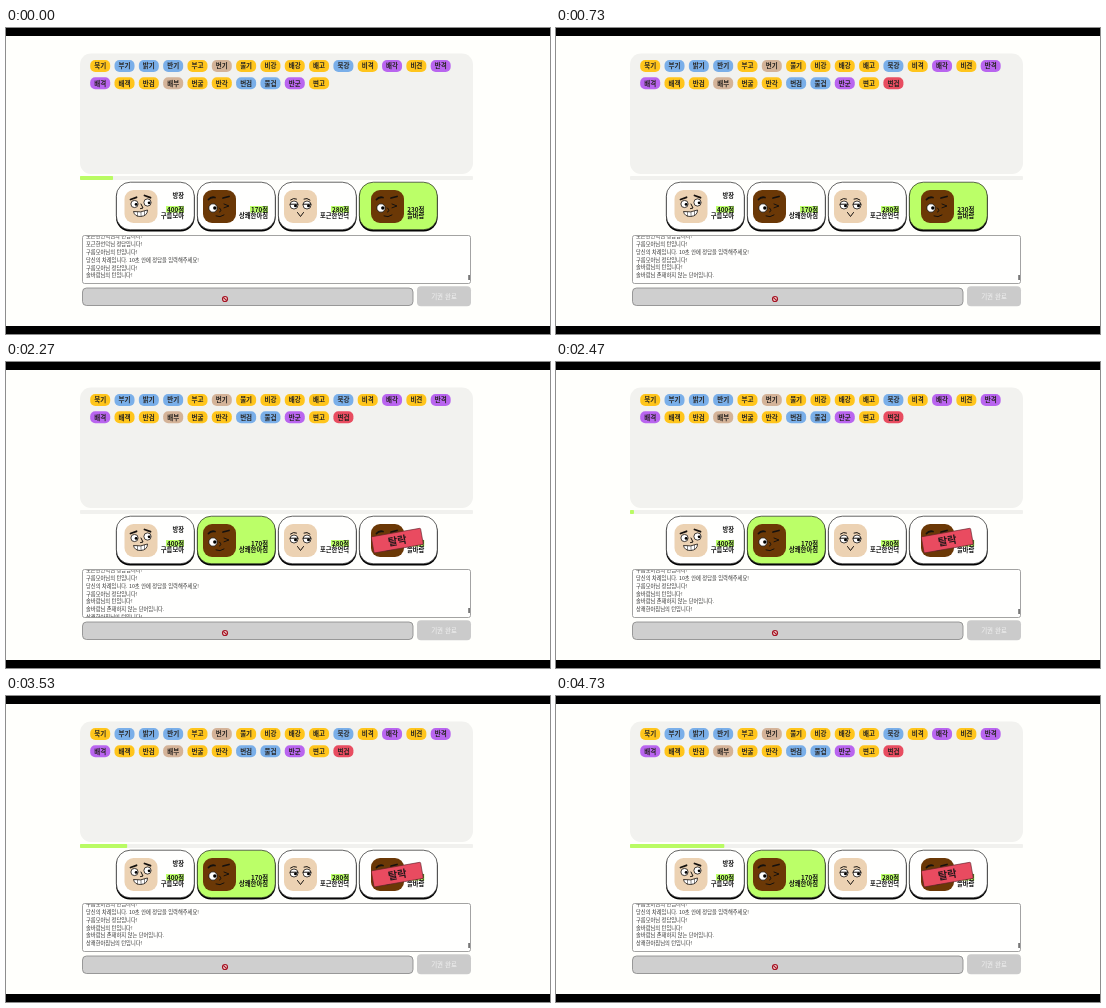
These frames come from a looping animation (544 px wide and 306 px high, 4790 ms). An HTML page:

```html
<!DOCTYPE html>
<html lang="ko">
<head>
<meta charset="utf-8">
<title>Word game</title>
<style>
html, body { margin: 0; width: 100%; height: 100%; overflow: hidden; background: #fffffc; }
svg { display: block; width: 544px; height: 306px; font-family: "Noto Sans CJK KR", "Noto Sans CJK", "Noto Sans", sans-serif; }
.chip { font-size: 6.5px; font-weight: 900; fill: #262320; text-anchor: middle; }
.info { font-size: 6.3px; font-weight: 900; fill: #111; text-anchor: end; }
.log { font-size: 5.25px; font-weight: 500; fill: #333; }
.button { font-size: 6.5px; font-weight: 500; fill: #f2f2f2; text-anchor: middle; }
.stamp { font-size: 10.3px; font-weight: 900; fill: #27191b; text-anchor: middle; }
.ink { fill: none; stroke: #15110e; stroke-width: 1; stroke-linecap: round; stroke-linejoin: round; }
.brow { stroke-width: 1.8; }
.eye { fill: #fff; stroke: #15110e; stroke-width: .8; }
</style>
</head>
<body>
<svg viewBox="0 0 544 306">
  <defs>
    <clipPath id="logClip"><rect x="77" y="208" width="387" height="47.3"/></clipPath>
    <g id="grin">
      <path class="ink brow" d="M6 9.5l6-2.2M20 5.5l6 2.2"/>
      <circle class="eye" cx="10" cy="14" r="3.6"/><circle class="eye" cx="23" cy="12.5" r="3.6"/>
      <circle cx="11.6" cy="14.4" r="1.4"/><circle cx="24.6" cy="12.8" r="1.4"/>
      <path class="ink" d="M16.5 14l2 4-2.5.6"/>
      <path class="eye" d="M9 21.5Q16 23 23 20Q23 26 16 26.5Q10 26.5 9 21.5Z"/>
      <path class="ink" style="stroke-width:.5" d="M13 22.3v3.7M16.5 22.2v4.2M20 21.3v4"/>
    </g>
    <g id="wink">
      <path class="ink brow" d="M5.5 9.5Q8 6.5 12 7.5M20 8l6-1.5"/>
      <circle class="eye" cx="10" cy="18" r="4.2"/><circle cx="11.8" cy="18" r="1.7"/>
      <path class="ink" d="M21 14l5 2-5 1.8M16.5 18q3 3 0 4M13 26q4 2 8-1"/>
    </g>
    <g id="calm">
      <path class="ink" d="M6.5 10q3-2.5 6-1M20 9q3-1.5 6 1"/>
      <circle class="eye" cx="10" cy="15" r="4"/><circle class="eye" cx="23" cy="15" r="4"/>
      <path class="ink" d="M6 14.2h8M19 14.2h8"/>
      <circle cx="11.5" cy="15.8" r="1.5"/><circle cx="24.5" cy="15.8" r="1.5"/>
      <path class="ink" d="M13.5 22.5l3 4 3-4"/>
    </g>
  </defs>
  <rect width="544" height="8"/>
  <rect y="298" width="544" height="8"/>
  <rect x="74" y="25.5" width="393" height="120.5" rx="11" fill="#f2f2ef"/>
  <g id="chips"></g>
  <rect x="74" y="148" width="393" height="4" rx="1" fill="#f1f1ee"/>
  <rect id="bar" x="74" y="148" height="4" rx=".8" fill="#b9fb63"/>
  <g id="cards"></g>
  <g id="stamp" transform="translate(391.3 178.6) rotate(-10)">
    <rect x="-25" y="-8.2" width="50" height="16.4" rx="1" fill="#e94b60" stroke="#5c222a" stroke-width=".6"/>
    <text class="stamp" y="3.8">탈락</text>
  </g>
  <rect x="76.5" y="207.5" width="388" height="48" rx="2" fill="#fffffe" stroke="#8c8c8c" stroke-width=".8"/>
  <g clip-path="url(#logClip)"><g id="log"></g></g>
  <rect id="thumb" x="462.2" y="247" width="1.8" height="5" fill="#777"/>
  <rect x="76.5" y="260" width="330.5" height="17.5" rx="4" fill="#cfcfcf" stroke="#858585" stroke-width=".8"/>
  <rect x="411" y="258.3" width="54" height="20" rx="4" fill="#cbcbcb"/>
  <text class="button" x="438" y="270.6">기권 완료</text>
  <g fill="#f3dada" stroke="#a51423" stroke-width="1.2">
    <circle cx="219" cy="271" r="2.5"/><path d="M217.3 269.3l3.4 3.4"/>
  </g>
</svg>
<script>
const LOOP = 4790, GREEN = '#bbff68', STEP = 393 / 50, LINE = 7.8;
const $ = id => document.getElementById(id);
const text = (cls, x, y, s) => `<text class="${cls}" x="${x}" y="${y}">${s}</text>`;

const colors = { y: '#ffc51c', b: '#7aafe9', t: '#d4b398', p: '#b965ef', r: '#e84d60' };
const rows = [
  ['북기 부기 밝기 반기 부고 번기 물기 비강 배강 배고 북강 비격 배각 비견 반격', 'ybbbytyyyybypyp'],
  ['배격 배객 반검 배부 번굴 반각 번검 물겁 반군 변고 변겁', 'pyytyybbpyr']
];
$('chips').innerHTML = rows.map(([words, tones], r) => words.split(' ').map((word, i) => {
  const x = 94.2 + 24.32 * i, y = 38 + 17.2 * r;
  return `<g><rect x="${x - 10}" y="${y - 6}" width="20" height="12" rx="5" fill="${colors[tones[i]]}"/>${text('chip', x, y + 2.4, word)}</g>`;
}).join('')).join('');
const lastChip = $('chips').lastElementChild;

const SKIN = '#ecd2b3', BROWN = '#6b3806';
const players = [
  { name: '구름모아', score: 400, face: 'grin', tone: SKIN, left: 118.5, right: 178, host: true },
  { name: '상쾌한아침', score: 170, face: 'wink', tone: BROWN, left: 197, right: 262 },
  { name: '포근한언덕', score: 280, face: 'calm', tone: SKIN, left: 278, right: 343 },
  { name: '솔바람', score: 230, face: 'wink', tone: BROWN, left: 365, right: 418.3 }
];
$('cards').innerHTML = players.map((p, i) => {
  const x = 110.3 + 81 * i;
  return `<rect x="${x - .3}" y="156" width="78.6" height="47.6" rx="14"/>
    <rect class="card" x="${x}" y="154.2" width="78" height="47.6" rx="14" stroke="#222" stroke-width=".7"/>
    <rect x="${p.left}" y="162" width="33" height="33" rx="9" fill="${p.tone}"/>
    <use href="#${p.face}" x="${p.left}" y="162"/>
    <rect x="${p.right - 18}" y="178" width="18" height="6.6" fill="${GREEN}"/>
    ${p.host ? text('info', p.right, 170.4, '방장') : ''}
    ${text('info', p.right, 183.5, p.score + '점')}${text('info', p.right, 190.4, p.name)}`;
}).join('');
const cards = document.querySelectorAll('.card');

const [first, second, third, fourth] = players.map(p => p.name + '님');
const turn = who => who + '의 턴입니다!', correct = who => who + ' 정답입니다!';
$('log').innerHTML = [
  turn(third), correct(third), turn(first),
  '당신의 차례입니다. 10초 안에 정답을 입력해주세요!',
  correct(first), turn(fourth), fourth + ' 존재하지 않는 단어입니다.', turn(second)
].map((s, i) => text('log', 80, 210.3 + LINE * i, s)).join('');
const lines = $('log').children;

// The timer advances every 200 ms, in two half steps 60 ms apart.
const ticks = t => Math.floor(t / 200) + (t % 200 < 60 ? .5 : 1);
const show = (el, on) => el.setAttribute('visibility', on ? 'visible' : 'hidden');

function render(t) {
  const out = t >= 2270;
  const steps = t < 270 ? ticks(t + 730) + .2 : t < 2470 ? 0 : ticks(t - 2470);
  $('bar').setAttribute('width', steps * STEP);
  show(lastChip, t >= 270);
  show(lines[6], t >= 270);
  show(lines[7], out);
  show($('stamp'), out);
  cards.forEach((c, i) => c.setAttribute('fill', i === (out ? 1 : 3) ? GREEN : '#fffffe'));
  const scroll = t < 470 ? 0 : t < 2470 ? 1 : 2;
  $('log').setAttribute('transform', `translate(0 ${-LINE * scroll})`);
  const pending = t >= 270 && t < 470 || out && t < 2470;
  $('thumb').setAttribute('y', pending ? 246 : 247);
}

const start = performance.now();
function frame() {
  render((performance.now() - start) % LOOP);
  requestAnimationFrame(frame);
}
frame();
</script>
</body>
</html>
```
